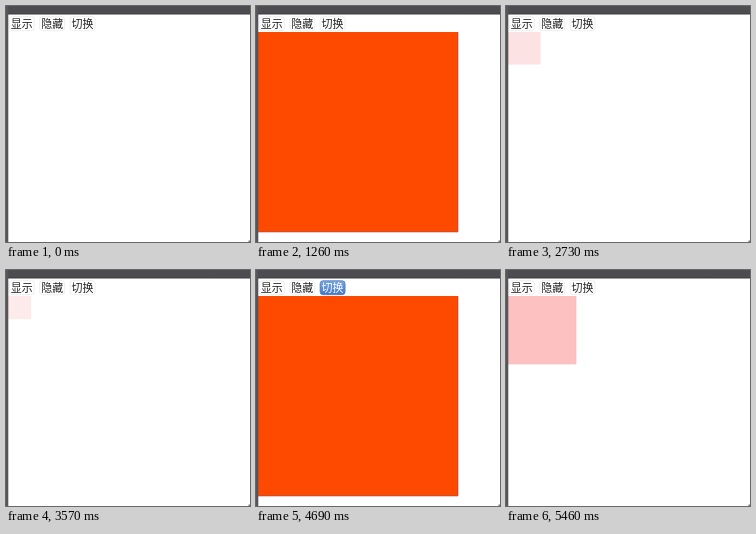
An HTML page for the animation above (5.53 s loop, 244 px wide and 236 px high).

```html
<!DOCTYPE html>
<html lang="zh-CN">
<head>
<meta charset="utf-8">
<title>显示 隐藏 切换</title>
<style>
html, body { margin: 0; width: 100%; height: 100%; overflow: hidden; background: #fff; }
svg { display: block; width: 100vw; height: 100vh; }
text { font: 11px "Noto Sans CJK SC", "Noto Sans CJK", sans-serif; fill: #222; }
.key { fill: #fff; stroke: #e6e6e6; stroke-width: .7; }
.on .key { fill: url(#press); stroke: #4a78bd; }
.on text { fill: #fff; }
</style>
</head>
<body>
<svg viewBox="0 0 244 236">
  <defs>
    <linearGradient id="press" x2="0" y2="1">
      <stop stop-color="#79a7e3"/>
      <stop offset="1" stop-color="#4276c6"/>
    </linearGradient>
  </defs>
  <rect width="244" height="236" fill="#fff"/>
  <g id="buttons"></g>
  <rect id="box" x="2" y="26"/>
  <path id="edge" fill="none" stroke="#8e4a5c" stroke-width=".8"/>
  <rect width="244" height="8" fill="#4d4c50"/>
  <rect y="7.5" width="244" height="1" fill="#3c3b3f"/>
  <rect width="2.3" height="236" fill="#565559"/>
  <rect x="242.5" y="234.5" width="1.5" height="1.5" fill="#777"/>
</svg>
<script>
const LOOP = 5530, FADE = 1000, SIDE = 200;
const X = 2, Y = 26;
const SVG = 'http://www.w3.org/2000/svg';
const box = document.getElementById('box');
const edge = document.getElementById('edge');

// Each click: pressed button, press time, release time, shown afterwards
const clicks = [
  { button: 0, down: 70, up: 191, show: true },
  { button: 1, down: 1890, up: 1995, show: false },
  { button: 2, down: 3290, up: 3350, show: true },
  { button: 2, down: 4690, up: 4858, show: false }
];

function add(parent, tag, attrs) {
  const el = document.createElementNS(SVG, tag);
  for (const k in attrs) el.setAttribute(k, attrs[k]);
  return parent.appendChild(el);
}

const buttons = ['显示', '隐藏', '切换'].map((label, i) => {
  const x = 3.3 + i * 30.4;
  const g = add(document.getElementById('buttons'), 'g', {});
  add(g, 'rect', { class: 'key', x, y: 10.7, width: 25, height: 14, rx: 3 });
  add(g, 'text', { x: x + 12.5, y: 22, 'text-anchor': 'middle' }).textContent = label;
  return g;
});

const swing = p => 0.5 - Math.cos(Math.PI * p) / 2;

function amount(t) {
  const last = clicks.filter(c => t >= c.up).pop();
  if (!last) return 0;
  const s = swing(Math.min(1, (t - last.up) / FADE));
  return last.show ? s : 1 - s;
}

function tint(s) {
  const rest = 1 - s;
  const green = 74 + 181 * rest;
  const blue = 255 * Math.pow(rest, 0.65);
  return `rgb(253,${Math.round(green)},${Math.round(blue)})`;
}

function draw(t) {
  const s = amount(t), size = SIDE * s;
  const visible = s > 0.07;
  box.setAttribute('width', visible ? size : 0);
  box.setAttribute('height', visible ? size : 0);
  box.setAttribute('fill', tint(s));
  edge.setAttribute('d', `M${X + size} ${Y}v${size}h${-size}`);
  edge.setAttribute('opacity', visible ? 0.7 * s * s : 0);
  buttons.forEach((g, i) => {
    const on = clicks.some(c => c.button === i && t >= c.down && t < c.up);
    g.setAttribute('class', on ? 'on' : '');
  });
}

const start = performance.now();
function tick() {
  draw((performance.now() - start) % LOOP);
  requestAnimationFrame(tick);
}
tick();
</script>
</body>
</html>
```
